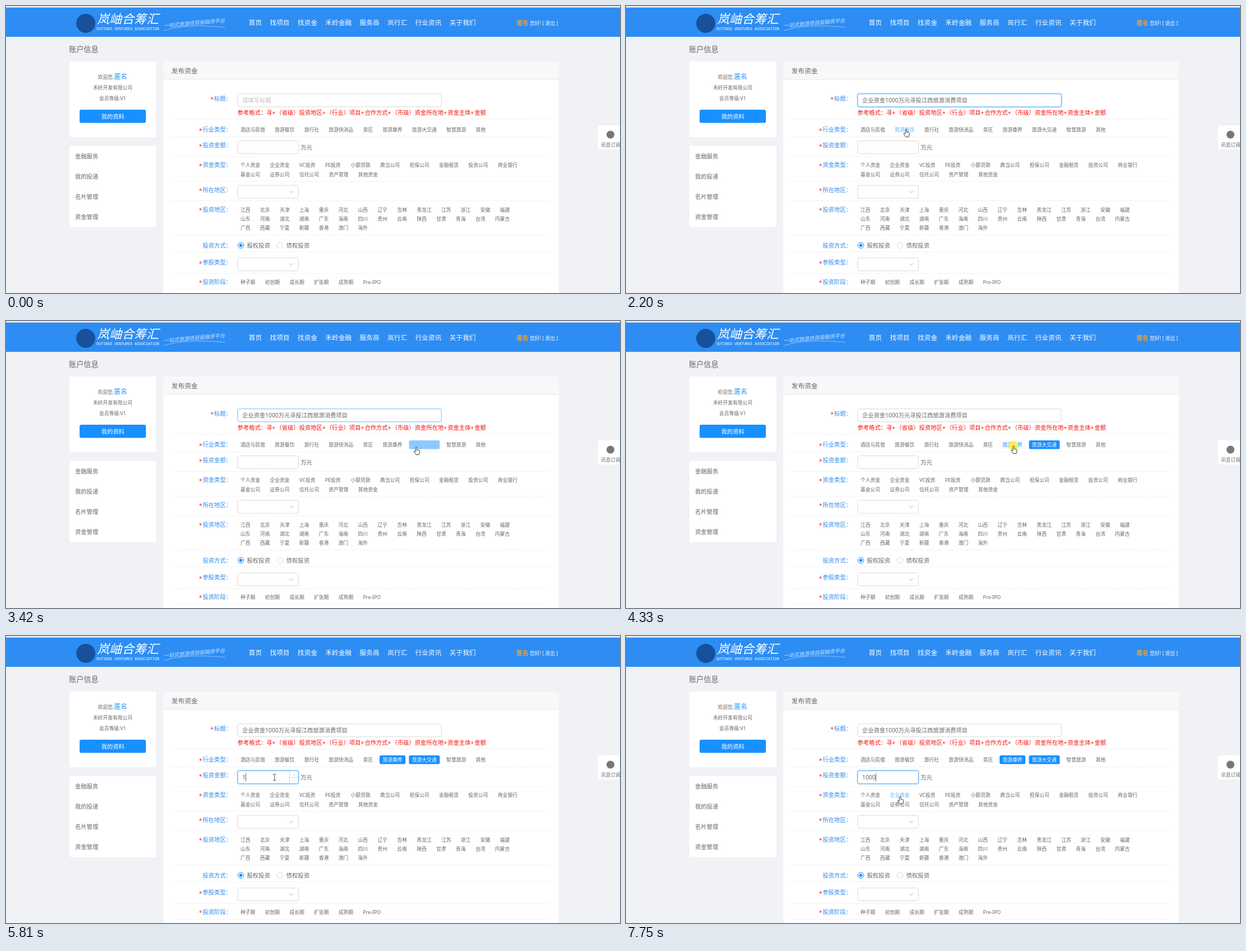
These frames come from a looping animation (1093x512 px, 8000 ms). An HTML page:

```html
<!DOCTYPE html>
<html lang="zh-CN">
<head>
<meta charset="utf-8">
<title>发布资金</title>
<style>
  html, body { margin: 0; width: 100%; height: 100%; overflow: hidden; background: #f0f2f6; }
  svg { display: block; width: 1093px; height: 512px; }
  text { font-family: "Noto Sans", "Noto Sans CJK SC", "Noto Sans CJK", sans-serif; white-space: pre; }
  .mono { font-family: "Liberation Mono", monospace; }
</style>
</head>
<body>
<svg id="stage" viewBox="0 0 1093 512"></svg>
<script>
const LOOP = 8000, STEP = 77, BLINK = 545, FADE = 250;
const BLUE = '#1890ff', FOCUS = '#54b2ff', LINE = '#d9d9d9', INK = '#666', LABEL = '#2d8cf0';
const SMALL = 8.75, BODY = 10.3, LARGE = 11.7;
const stage = document.getElementById('stage');

function set(node, attrs) {
  for (const k in attrs) node.setAttribute(k, attrs[k]);
}
function el(tag, attrs, content) {
  const node = document.createElementNS('http://www.w3.org/2000/svg', tag);
  set(node, attrs);
  if (content) node.textContent = content;
  stage.append(node);
  return node;
}
const rect = (x, y, width, height, fill, rx = 0, more = {}) =>
  el('rect', { x, y, width, height, fill, rx, ...more });
const circle = (cx, cy, r, fill, stroke = 'none') => el('circle', { cx, cy, r, fill, stroke });
const path = (d, stroke, more = {}) => el('path', { d, stroke, fill: 'none', ...more });
// y is the middle of the line
const text = (s, x, y, size, fill = INK, more = {}) =>
  el('text', { x, y: y + size * 0.37, 'font-size': size, fill, ...more }, s);
const show = (node, amount) => set(node, { opacity: +amount });

// ---- header ----
rect(0, 0, 1093, 3, '#eceef1');
rect(0, 2, 1093, 1, '#c9d3de');
rect(0, 3, 1093, 52, '#2d8df3');
circle(142, 31, 17, '#17519c');
text('岚岫合筹汇', 162, 23, 22, '#fff', { 'font-style': 'italic', 'font-weight': 500 });
text('OUTINGS VENTURES ASSOCIATION', 161, 41, 6.67, '#fff', { class: 'mono' });
text('一站式旅游项目投融资平台', 281, 35, 9.1, '#d5e8fd', { transform: 'rotate(-5 281 38)', 'font-style': 'italic' });
path('M281 44Q318 31 390 38', '#a9d0fb', { 'stroke-width': 0.8 });
let navX = 432;
for (const s of '首页 找项目 找资金 禾岭金融 服务商 岚行汇 行业资讯 关于我们'.split(' ')) {
  text(s, navX, 30, LARGE, '#fff', { 'font-weight': 500 });
  navX += s.length * LARGE + 14.3;
}
text('匿名', 909, 30.5, 10.6, '#ffa01e', { 'font-weight': 700 });
text('您好! [ 退出 ]', 932.5, 30.5, SMALL, '#fff', { 'font-weight': 500 });

// ---- side column ----
text('账户信息', 112, 77, 13.2);
rect(113, 99, 154.5, 135, '#fff', 3);
text('欢迎您,', 163.5, 127, SMALL);
text('匿名', 192.5, 126, LARGE, BLUE);
text('禾岭开发有限公司', 155, 146, SMALL);
text('会员等级:V1', 166, 165, SMALL);
rect(131, 185, 118, 23.5, BLUE, 3);
text('我的资料', 169.7, 197, BODY, '#fff');
rect(113, 249.5, 154.5, 145, '#fff', 3);
['金融服务', '我的投递', '名片管理', '资金管理'].forEach((s, i) => text(s, 123, 268 + i * 36.2, BODY));

// ---- floating button ----
rect(1054, 213, 45, 43, '#fff', 2);
circle(1076, 229.5, 7, '#777');
text('讯息订阅', 1059, 248, SMALL);

// ---- form ----
rect(280, 99, 704, 420, '#fff', 3);
rect(280, 99, 704, 32, '#f8f8f9', 3);
rect(280, 130.5, 704, 1, '#e6e8eb');
text('发布资金', 294.5, 115.5, LARGE);

const tags = [];
function tagLine(names, y) {
  let x = 417.5;
  for (const name of names.split(' ')) {
    const w = [...name].reduce((sum, c) => sum + (c < '\u0100' ? 5.45 : SMALL), 0);
    const back = rect(x - 5.5, y - 8, w + 11, 15.5, BLUE, 2.5, { opacity: 0 });
    tags.push({ name, x, y, w, back, label: text(name, x, y, SMALL) });
    x += w + 17.35;
  }
}
// label, its middle, divider below, lines of options
[['标题', 165, 201],
 ['行业类型', 220.5, 233, '酒店与民宿 旅游餐饮 旅行社 旅游快消品 景区 旅游康养 旅游大交通 智慧旅游 其他'],
 ['投资金额', 248.5, 268],
 ['资金类型', 283.5, 312, '个人资金 企业资金 VC投资 PE投资 小额贷款 典当公司 担保公司 金融租赁 投资公司 商业银行',
   '基金公司 证券公司 信托公司 资产管理 其他资金'],
 ['所在地区', 328, 347],
 ['投资地区', 363, 408, '江西 北京 天津 上海 重庆 河北 山西 辽宁 吉林 黑龙江 江苏 浙江 安徽 福建',
   '山东 河南 湖北 湖南 广东 海南 四川 贵州 云南 陕西 甘肃 青海 台湾 内蒙古',
   '广西 西藏 宁夏 新疆 香港 澳门 海外'],
 ['投资方式', 427, 438],
 ['参股类型', 457.5, 477],
 ['投资阶段', 492, 505, '种子期 初创期 成长期 扩张期 成熟期 Pre-IPO']
].forEach(([label, y, bottom, ...lines]) => {
  const x = 391.2 - label.length * BODY;
  text(label + '：', x, y, BODY, LABEL);
  if (label !== '投资方式') text('*', x - 6.5, y + 1.5, 10, '#f5222d');
  path(`M295 ${bottom + 0.5}H967`, '#e6e6e6', { 'stroke-dasharray': '2.2 1.5', 'stroke-width': 0.8 });
  lines.forEach((names, i) => tagLine(names, y + 0.6 + i * 16.3));
});

function field(y, w) {
  const glow = rect(411.5, y - 1, w + 2, 25, 'none', 3.5, { stroke: BLUE, 'stroke-width': 2, opacity: 0 });
  const box = rect(412.5, y, w, 23, '#fff', 3, { stroke: LINE });
  const inside = (px, py) => px > 412 && px < 413 + w && py > y && py < y + 23.5;
  return { glow, box, inside };
}
const title = field(156.8, 362.5);
const amount = field(240.5, 108);
for (const y of [320, 449.5]) {
  field(y, 108);
  path(`M504.5 ${y + 9.5}l3.3 4 3.3-4`, '#bbb');
}
text('万元', 524.5, 252.5, BODY);

let hintX = 412;
'参考格式：寻+（省级）投资地区+（行业）项目+合作方式+（市级）资金所在地+资金主体+金额'
  .split(/(\+)/).forEach(s => {
    text(s, hintX, 190, BODY, '#f5120a');
    hintX += s === '+' ? 6.8 : s.length * BODY;
  });

circle(418, 427, 5.2, '#fff', BLUE);
circle(418, 427, 2.8, BLUE);
text('股权投资', 429, 427, BODY);
circle(487.5, 427, 5.2, '#fff', LINE);
text('债权投资', 499, 427, BODY);

// ---- moving parts ----
const hintText = text('请填写标题', 420.5, 168.5, BODY, '#bfbfbf');
const titleText = text('企业资金1000万元寻投江西旅游消费项目', 420.5, 168.5, 10.25);
const amountText = text('', 420.5, 252.5, BODY);
const spinner = path('M504.5 241V263.5M504.5 252.3H520M510.3 249l2-2.2 2 2.2M510.3 256.5l2 2.2 2-2.2',
  '#c8c8c8', { 'stroke-width': 0.8 });
const caret = rect(0, 0, 1, 14, '#555');
const halo = circle(0, 0, 8.5, '#ffef4a');
const solid = { fill: '#fff', 'stroke-width': 0.9, 'stroke-linejoin': 'round' };
const pointers = {
  arrow: path('M0 0V12.5L3 9.8 5 14.2 6.8 13.4 4.9 9.2H9Z', '#222', solid),
  hand: path('M-1.2 8V1.2a1.2 1.2 0 0 1 2.4 0V5l3.6.8q1.4.4 1.2 1.8l-.5 3.4-1 2.6H-.3L-3.8 8.8q-.6-1.5.8-1.7z', '#222', solid),
  beam: path('M-2.5-5.5h1.7l.8.6.8-.6h1.7M0-5V5M-2.5 5.5h1.7l.8-.6.8.6h1.7', '#333', { 'stroke-width': 0.9 })
};

// pointer moves: start, end, destination
const moves = [
  [110, 880, 520, 166],
  [1730, 2440, 496, 226],
  [2540, 3310, 730.5, 225],
  [4020, 4250, 690, 223],
  [4480, 4870, 478, 252],
  [6990, 7430, 487.5, 291.5],
  [7600, 7680, 488, 286]
];
const picks = { 旅游大交通: 3300, 旅游康养: 4320 };
const clicks = [870, 3260, 4320, 4940];
const focus = 870, blur = 3300, refocus = 4870;
// moments that restart the caret: focus, paste, focus, four digits
const keys = [1030, 1190, 4930, 5810, 6040, 6210, 6360];

const ramp = (t, from, span = FADE) => Math.max(0, Math.min(1, (t - from) / span));
function mix(a, b, k) {
  const part = (c, i) => parseInt(c.slice(1 + 2 * i, 3 + 2 * i), 16);
  return `rgb(${[0, 1, 2].map(i => Math.round(part(a, i) + (part(b, i) - part(a, i)) * k))})`;
}
function pointerAt(t) {
  let x = 953, y = 432;
  for (const [start, end, toX, toY] of moves) {
    if (t < start) break;
    const steps = Math.floor((t - start) / STEP + 0.06) + 1;
    const k = 1 - (1 - ramp(steps * STEP, 0, end - start + STEP)) ** 2;
    x += (toX - x) * k;
    y += (toY - y) * k;
  }
  return [x, y];
}

function drawTags(x, y, t) {
  let over = false;
  for (const tag of tags) {
    const hover = t >= moves[0][0] && Math.abs(y - tag.y) < 8 && x > tag.x - 5.5 && x < tag.x + tag.w + 5.5;
    over = over || hover;
    const k = tag.name in picks ? ramp(t, picks[tag.name]) : 0;
    show(tag.back, k);
    set(tag.label, {
      fill: k ? mix(BLUE, '#ffffff', k) : hover ? FOCUS : INK,
      'font-weight': k === 1 ? 500 : 400
    });
  }
  return over;
}

function drawField({ box, glow }, edge, ring) {
  set(box, { stroke: mix(LINE, FOCUS, edge) });
  show(glow, 0.22 * ring);
}

function draw(t) {
  const [x, y] = pointerAt(t);
  const present = t >= moves[0][0];
  const kind = drawTags(x, y, t) ? 'hand' : title.inside(x, y) || amount.inside(x, y) ? 'beam' : 'arrow';
  for (const name in pointers) {
    show(pointers[name], present && name === kind);
    set(pointers[name], { transform: `translate(${x} ${y})` });
  }
  show(halo, clicks.some(c => t >= c && t < c + 150));
  set(halo, { cx: x - 0.5, cy: y - 0.5 });

  drawField(title, ramp(t, focus - 80) * (1 - ramp(t, blur) ** 2), ramp(t, focus, 170) * (1 - ramp(t, blur - 70, 200)));
  drawField(amount, ramp(t, refocus - 80), ramp(t, refocus));
  show(spinner, ramp(t, refocus) * (1 - ramp(t, 7080)));

  const pressed = keys.filter(k => k <= t);
  const pasted = pressed.length > 1;
  const typed = Math.max(0, pressed.length - 3);
  show(hintText, !pasted);
  show(titleText, pasted);
  amountText.textContent = '1000'.slice(0, typed);

  const focused = pressed.length > 0 && (t < blur || t >= keys[2]);
  show(caret, focused && Math.floor((t - pressed[pressed.length - 1]) / BLINK) % 2 === 0);
  set(caret, t < blur
    ? { x: pasted ? 606.5 : 420.5, y: 161.5 }
    : { x: 420.5 + typed * 5.95, y: 245 });
}

const begin = performance.now();
function tick() {
  draw((performance.now() - begin) % LOOP);
  requestAnimationFrame(tick);
}
tick();
</script>
</body>
</html>
```
